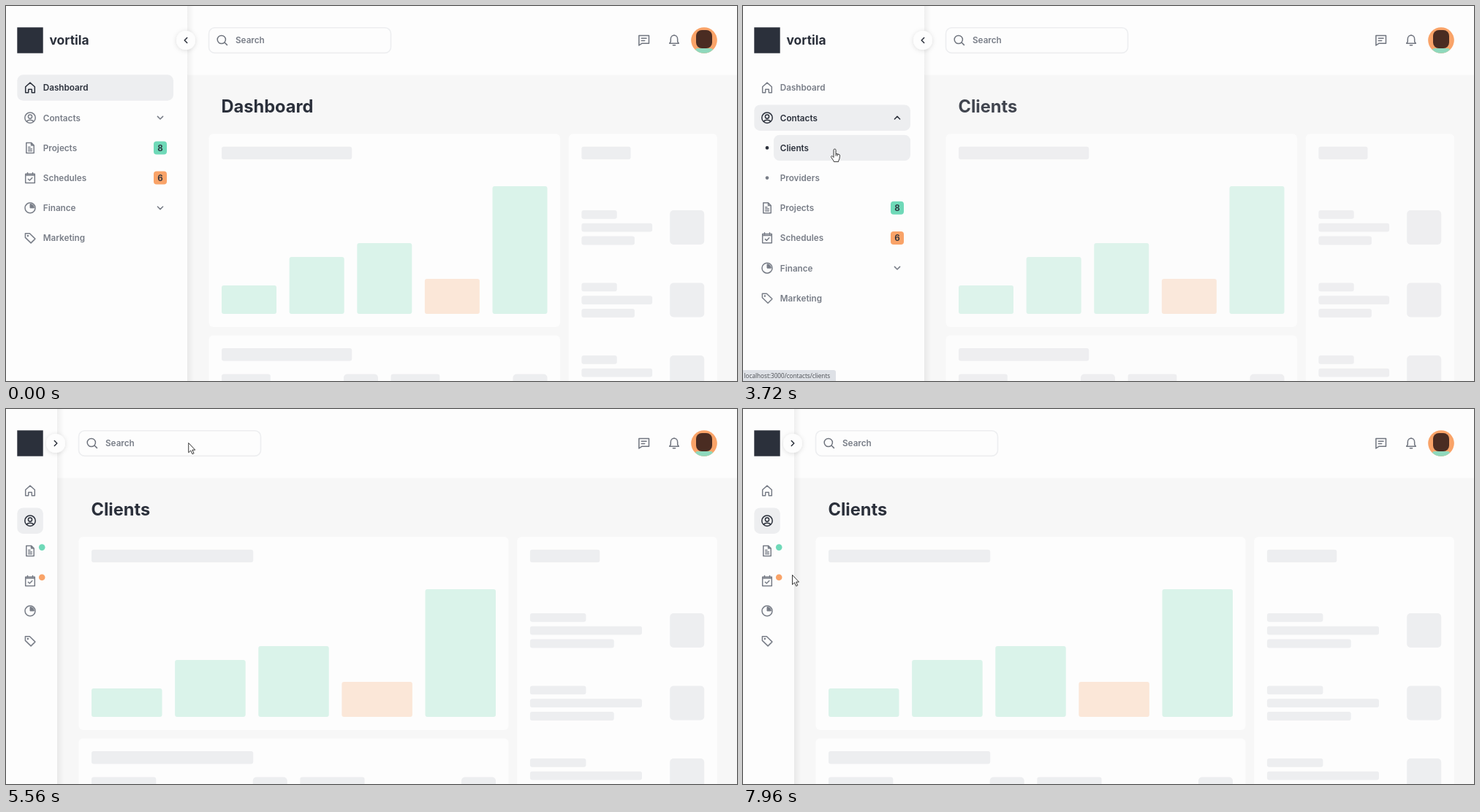
These frames come from a looping animation (1000 by 514 pixels, 8 s). An HTML page:

```html
<!DOCTYPE html>
<html lang="en">
<head>
<meta charset="utf-8">
<title>Dashboard sidebar</title>
<style>
html, body { margin: 0; width: 100%; height: 100%; overflow: hidden; background: #f7f7f7; }
svg { display: block; width: 100%; height: 100%; }
text { font-family: Inter, Roboto, sans-serif; font-size: 11.7px; font-weight: 600; white-space: pre; }
.icon { fill: none; stroke-width: 1.5; stroke-linecap: round; stroke-linejoin: round; }
</style>
</head>
<body>
<svg id="stage" viewBox="0 0 1000 514"></svg>
<script>
const stage = document.getElementById('stage');
const LOOP = 8000;
const APPEAR = 640, OPEN = 1800, VISIT = 3400, FOLD = 5120, SNAP = 5520;
const DARK = [43, 48, 59], MUTED = [120, 125, 135];
const GREY = '#edeef0', WHITE = '#fdfdfd', TEAL = '#6fd9b8', ORANGE = '#f9a368';
const ROW = 41.2, ROW_H = 35.4;

const ICONS = {
  home: 'M-6.3-1.2L0-6.9 6.3-1.2V6.8H2.3V2.2H-2.3V6.8H-6.3Z',
  person: 'M-7.2 0a7.2 7.2 0 1 0 14.4 0a7.2 7.2 0 1 0-14.4 0M-2.6-1.6a2.6 2.6 0 1 0 5.2 0a2.6 2.6 0 1 0-5.2 0M-4.6 5.4C-3.5 2.4 3.5 2.4 4.6 5.4',
  file: 'M-5.2-7H1.5L5.2-3.3V7H-5.2ZM1.5-7V-3.3H5.2M-2.4-1H0M-2.4 1.5H2.4M-2.4 4H2.4',
  calendar: 'M-6.3-5.4H6.3V6.8H-6.3ZM-6.3-3.6H6.3M-3.5-7.2V-5M3.5-7.2V-5M-2.6 1.6L-.7 3.4 2.8-.2',
  pie: 'M-7 0a7 7 0 1 0 14 0a7 7 0 1 0-14 0',
  tag: 'M-6.6-6.2H-.6L6.9 1.1 1.1 6.9-6.6-.6ZM-3.6-2.9a.5.5 0 1 0 1 0a.5.5 0 1 0-1 0',
  search: 'M-6.6-1a5.6 5.6 0 1 0 11.2 0a5.6 5.6 0 1 0-11.2 0M3.2 3L6.6 6.4',
  message: 'M-6.8-6.4H6.8V4.2H-2.6L-6.8 7ZM-3.4-2.8H3.4M-3.4.4H1',
  bell: 'M-6.3 4.2H6.3L4.7 1.8V-1.6C4.7-8.4-4.7-8.4-4.7-1.6V1.8ZM-1.6 6.8H1.6M0-6.8V-7.3'
};

const ITEMS = [
  { name: 'Dashboard', icon: 'home' },
  { name: 'Contacts', icon: 'person', chevron: true },
  { name: 'Projects', icon: 'file', badge: 8, color: TEAL },
  { name: 'Schedules', icon: 'calendar', badge: 6, color: ORANGE },
  { name: 'Finance', icon: 'pie', chevron: true },
  { name: 'Marketing', icon: 'tag' }
];
const SUBS = ['Clients', 'Providers'];

// time, x, y of the pointer tip
const PATH = [
  [640, 539, 425], [1400, 184.5, 153], [2440, 184.5, 153], [2600, 139, 187.5],
  [3000, 125.5, 196], [4160, 125.5, 196], [4600, 353, 140], [5040, 250, 46],
  [5540, 250, 46], [5920, 221, 106], [6130, 221, 106], [6520, 22, 160],
  [6920, 208, 248], [7210, 208, 248], [7590, 36, 141], [7960, 67.5, 227.5]
];

const clamp = v => Math.max(0, Math.min(1, v));
const lerp = (a, b, k) => a + (b - a) * k;
const ramp = (t, start, len) => clamp((t - start) / len);
const smooth = u => u * u * (3 - 2 * u);
const easeOut = u => 1 - (1 - u) ** 2;
const tint = k => `rgb(${MUTED.map((c, i) => Math.round(lerp(c, DARK[i], k)))})`;

const rect = (x, y, w, h, r, fill, extra = '') =>
  `<rect x="${x}" y="${y}" width="${w}" height="${h}" rx="${r}" fill="${fill}" ${extra}/>`;
const dot = (x, y, r, fill, extra = '') => `<circle cx="${x}" cy="${y}" r="${r}" fill="${fill}" ${extra}/>`;
const text = (x, y, str, fill, extra = '') => `<text x="${x}" y="${y}" fill="${fill}" ${extra}>${str}</text>`;
const icon = (d, x, y, color, turn = 0) =>
  `<path class="icon" d="${d}" stroke="${color}" transform="translate(${x} ${y}) rotate(${turn})"/>`;
const fade = (opacity, body) => `<g opacity="${opacity}">${body}</g>`;

function pointer(t) {
  let i = PATH.findIndex(p => p[0] > t);
  if (i < 0) return PATH[PATH.length - 1].slice(1);
  if (i === 0) return PATH[0].slice(1);
  const [t0, x0, y0] = PATH[i - 1], [t1, x1, y1] = PATH[i];
  const k = smooth((t - t0) / (t1 - t0));
  return [lerp(x0, x1, k), lerp(y0, y1, k)];
}

const folded = t => t >= SNAP;
const opened = t => folded(t) ? 0 : smooth(ramp(t, OPEN, 480));
const rowEnd = t => folded(t) ? 50.8 : 229;
const rowY = (i, t) => 112 + ROW * i + (i > 1 ? 2 * ROW * opened(t) : 0);
const subY = i => 112 + ROW * (i + 2);

// name of the control under the pointer
function hit(t) {
  if (t < APPEAR) return null;
  const [x, y] = pointer(t);
  if (Math.hypot(x - (folded(t) ? 68 : 246), y - 47) < 13) return 'toggle';
  if (x < 15 || x > rowEnd(t)) return null;
  const over = c => Math.abs(y - c) < ROW_H / 2;
  const item = ITEMS.find((it, i) => over(rowY(i, t)));
  if (item) return item.name;
  return opened(t) === 1 ? SUBS.find((s, i) => x > 42 && over(subY(i))) || null : null;
}

// 200 ms hover transition as a moving average
function hovers(t) {
  const sum = {};
  for (let s = 0; s < 8; s++) {
    const name = hit(t - s * 25);
    if (name) sum[name] = (sum[name] || 0) + 1 / 8;
  }
  return sum;
}

function header(left) {
  return rect(0, 0, 1000, 94.5, 0, WHITE) +
    rect(left, 29.8, 249, 34.6, 8, WHITE, `stroke="${GREY}" stroke-width="1.6"`) +
    icon(ICONS.search, left + 18.3, 47, tint(0.1)) +
    text(left + 36.5, 51.4, 'Search', tint(0)) +
    icon(ICONS.message, 872.7, 47, tint(0.1)) + icon(ICONS.bell, 914, 47, tint(0.1)) +
    '<clipPath id="face"><circle cx="955" cy="47" r="17.8"/></clipPath><g clip-path="url(#face)">' +
    rect(937, 29, 36, 36, 0, ORANGE) + rect(943, 58, 24, 8, 3, '#8fd9bd') +
    rect(944, 33, 22, 25, 8, '#4a2c22') + '</g>';
}

function page(t, left) {
  const wide = folded(t);
  const split = wide ? 687.5 : 758;
  const x = left + 17.5, w = split - left - 35;
  const bar = (bx, y, bw, h = 17.5, r = 3) => rect(bx, y, bw, h, r, GREY);
  let out = text(x - 0.5, 146, t < VISIT ? 'Dashboard' : 'Clients', tint(1), 'style="font-size:23.6px;font-weight:700"');
  out += rect(left, 175.3, split - left, 264.7, 6, WHITE) + bar(x, 192.8, w * 0.4);
  const step = (w + 17.6) / 5;
  [39, 78, 97, 48, 175].forEach((h, i) => {
    out += rect(x + i * step, 422 - h, step - 17.6, h, 3, i === 3 ? '#fbe7d8' : '#daf3ea');
  });
  out += rect(left, 451.5, split - left, 80, 6, WHITE) + bar(x, 469, w * 0.4);
  const half = (w - 17.6) / 2;
  for (const cx of [x, x + half + 17.6])
    out += bar(cx, 504.5, (half - 47) * 0.4) + bar(cx + half - 47, 504.5, 47, 47, 5);

  const sx = split + 11.8, lx = sx + 17.6, lw = 955.3 - lx;
  out += rect(sx, 175.3, 973 - sx, 350, 6, WHITE) + bar(lx, 192.8, lw * 0.4);
  for (let i = 0; i < 3; i++) {
    const y = 280 + i * 99.5;
    [0.4, 0.8, 0.6].forEach((k, j) => { out += bar(lx, y + j * 17.8, (lw - 47) * k, 11.8); });
    out += bar(908.2, y, 47, 47, 5);
  }
  return fade(t < VISIT ? 1 : easeOut(ramp(t, VISIT, 480)), out);
}

function sidebar(t) {
  const wide = folded(t), w = wide ? 70 : 248, end = rowEnd(t);
  const open = opened(t), over = hovers(t);
  const label = wide ? 0 : 1 - smooth(ramp(t, FOLD, 370));
  const active = {
    Dashboard: 1 - ramp(t, VISIT, 200),
    Contacts: ramp(t, OPEN, 1),
    Clients: ramp(t, VISIT, 150)
  };
  const level = name => Math.max(active[name] || 0, Math.min(1, over[name] || 0));
  const back = (x, c, k) => k ? rect(x, c - ROW_H / 2, end - x, ROW_H, 8, GREY, `opacity="${k}"`) : '';

  let out = rect(w, 0, 9, 514, 0, 'url(#edge)') + rect(0, 0, w, 514, 0, WHITE) +
    rect(15.3, 29.3, 35.4, 35.4, 0, tint(1)) +
    fade(label, text(59.5, 53, 'vortila', tint(1), 'style="font-size:17.4px;font-weight:700"'));

  ITEMS.forEach((it, i) => {
    const c = rowY(i, t), k = level(it.name), color = tint(k);
    out += back(15.3, c, k) + icon(ICONS[it.icon], 33, c, color);
    if (it.icon === 'pie') out += `<path d="M33 ${c}v-5.4a5.4 5.4 0 0 1 5.4 5.4Z" fill="${color}" stroke="${color}"/>`;
    out += fade(label, text(50.8, c + 4.3, it.name, color));
    if (it.chevron && t < FOLD + 120)
      out += icon('M-3.6-1.8L0 1.8 3.6-1.8', 211, c, color, it.name === 'Contacts' ? 180 * open : 0);
    if (it.badge) {
      out += t < FOLD + 40
        ? rect(202, c - 9, 18, 18, 4, it.color) + text(211, c + 4.3, it.badge, tint(1), 'text-anchor="middle"')
        : dot(wide ? 49.2 : 229, c - 4.8, 4.3, it.color);
    }
  });

  if (open && !wide) {
    const list = SUBS.map((name, i) => {
      const c = subY(i), k = level(name);
      return back(42, c, k) + dot(33, c, 2.3, tint(k)) + text(50.8, c + 4.3, name, tint(k));
    }).join('');
    out += fade(open * open * label * label, list);
  }

  out += dot(w - 2, 47, 13, WHITE, 'filter="url(#soft)"') +
    icon('M1.7-3.5L-1.8 0 1.7 3.5', w - 2, 47, tint(1), 180 * ramp(t, FOLD, 200));
  return out;
}

function status(t) {
  const k = ramp(t, 2720, 160) - ramp(t, 4200, 200);
  return k <= 0 ? '' : fade(k, rect(-3, 499, 130, 18, 3, '#dee1e6') +
    text(1.5, 510, 'localhost:3000/contacts/clients', '#4a4d52',
      'style="font:400 8.2px \'Open Sans\',\'Noto Sans\',sans-serif"'));
}

function cursor(t) {
  if (t < APPEAR) return '';
  const [x, y] = pointer(t);
  const shape = hit(t)
    ? 'M-1.5 1.5a1.5 1.5 0 0 1 3 0V6.4l4 .9a1.9 1.9 0 0 1 1.5 2.1l-.7 4.4-1.1 2.4v1.2H-1.2l-.6-1.6-3-4.4c-.8-1.4.7-2.4 1.8-1.4l1.5 1.5ZM1.5 6.5V9.6M3.6 7V9.8'
    : 'M0 0V13.2L3 10.4 5.2 15.2 7.3 14.2 5.1 9.6H9Z';
  return `<path d="${shape}" transform="translate(${x} ${y})" fill="#fff" stroke="#222" stroke-width=".9" stroke-linejoin="round"/>`;
}

const DEFS = `<defs>
  <linearGradient id="edge"><stop stop-color="#000" stop-opacity=".055"/><stop offset="1" stop-color="#000" stop-opacity="0"/></linearGradient>
  <filter id="soft" x="-50%" y="-50%" width="200%" height="200%"><feDropShadow dx="0" dy="1" stdDeviation="3" flood-opacity=".13"/></filter>
</defs>`;

function draw(t) {
  const left = folded(t) ? 99.5 : 277.5;
  stage.innerHTML = DEFS + rect(0, 0, 1000, 514, 0, '#f7f7f7') +
    header(left) + page(t, left) + sidebar(t) + status(t) + cursor(t);
}

const start = performance.now();
function tick() {
  draw((performance.now() - start) % LOOP);
  requestAnimationFrame(tick);
}
tick();
</script>
</body>
</html>
```
